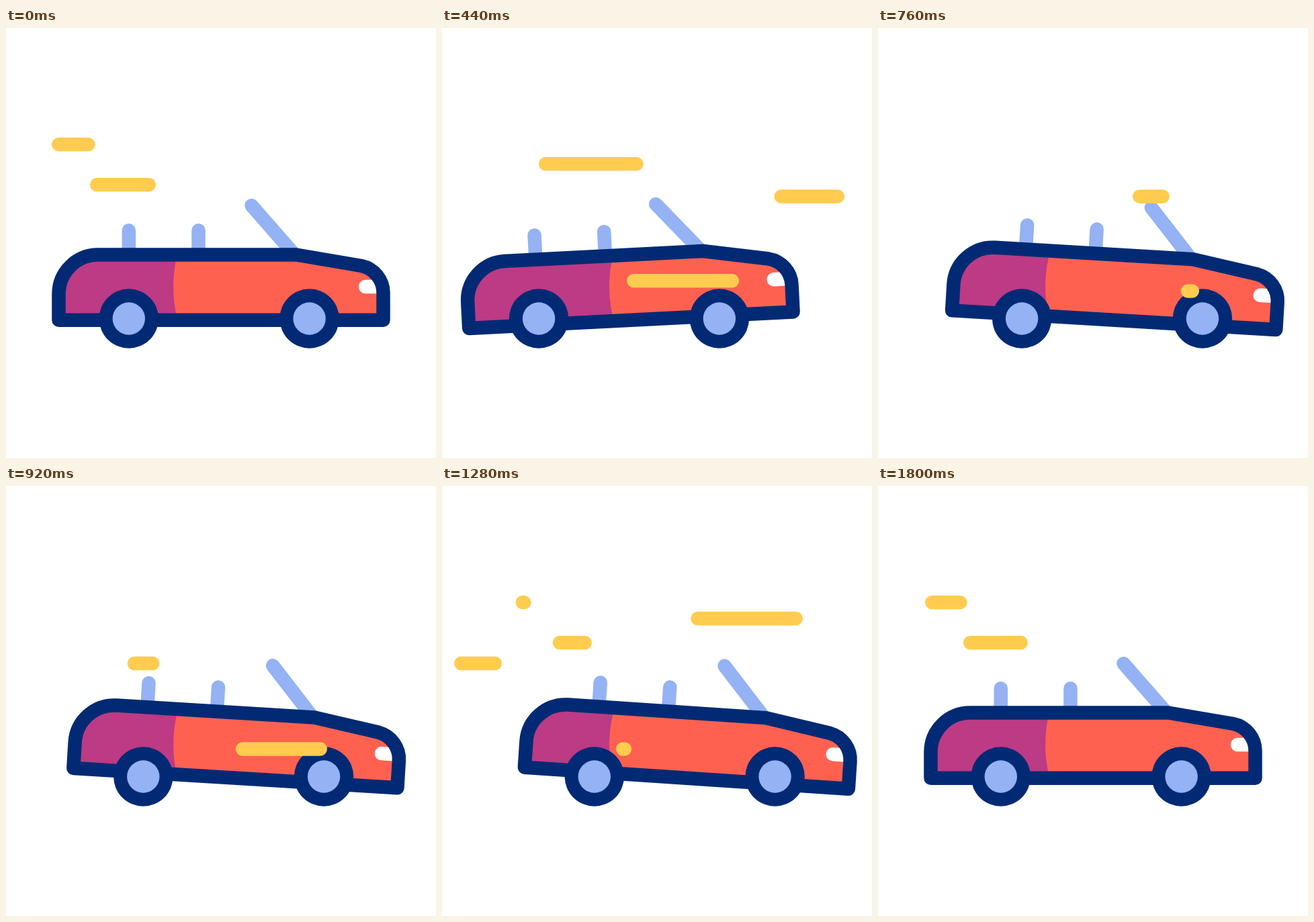
An HTML page with a canvas for the animation above (2 s loop, 640 by 640 pixels).

```html
<!DOCTYPE html>
<html lang="en">
<head>
<meta charset="utf-8">
<title>Convertible</title>
<style>
html, body { margin: 0; width: 100%; height: 100%; overflow: hidden; background: #fff; }
canvas { display: block; width: 100vw; height: 100vh; }
</style>
</head>
<body>
<canvas id="stage" width="640" height="640"></canvas>
<script>
const ctx = document.getElementById('stage').getContext('2d');
const LOOP = 2000, LAST = 1800, STEP = 40;
const NAVY = '#022a74', RED = '#ff6151', PURPLE = '#bd3a85';
const BLUE = '#94b2f4', YELLOW = '#ffcc4f';
const WIDTH = 20.5;
const PIVOT = { x: 320, y: 432.5 };

// time, shift, tilt in degrees
const drive = [
  [0, 0, 0], [320, -52, -4.1], [800, 33, 3.55],
  [1040, 10, 3.4], [1280, 44, 3.8], [1680, 0, 0]
];

// Each streak grows leftwards from `right`, then its right end catches up.
const streaks = [
  { y: 173.3, left: 68, right: 132.5, grow: -800, shrink: 0, span: 400 },
  { y: 233.2, left: 125, right: 223, grow: -800, shrink: 160, span: 280 },
  { y: 202.3, left: 144, right: 363.5, grow: 80, shrink: 304, span: 360 },
  { y: 250.8, left: 379, right: 599, grow: 279, shrink: 495, span: 360 },
  { y: 376.3, left: 224, right: 443.5, grow: 226, shrink: 424, span: 320 },
  { y: 391.5, left: 259, right: 478, grow: 720, shrink: 944, span: 360 },
  { y: 264, left: 18, right: 228.5, grow: 846, shrink: 1075, span: 310 },
  { y: 197.3, left: 364, right: 583.5, grow: 958, shrink: 1167, span: 360 },
  { y: 233.2, left: 127, right: 223, grow: 1100, shrink: LOOP, span: 360 },
  { y: 173.3, left: 68, right: 132.5, grow: 1180, shrink: LOOP, span: 711 }
];

const body = new Path2D(
  'M78.5 434.7V396A58.5 58.5 0 0 1 137 337.5H432L529 354' +
  'C548 358 561.5 375 561.5 394V434.7Z'
);

function ease(t) {
  t = Math.min(1, Math.max(0, t));
  return t * t * (3 - 2 * t);
}

function pose(t) {
  let i = 0;
  while (i < drive.length - 2 && t > drive[i + 1][0]) i++;
  const a = drive[i], b = drive[i + 1];
  const k = ease((t - a[0]) / (b[0] - a[0]));
  return {
    shift: a[1] + (b[1] - a[1]) * k,
    tilt: (a[2] + (b[2] - a[2]) * k) * Math.PI / 180
  };
}

function bar(x1, y1, x2, y2, color) {
  ctx.strokeStyle = color;
  ctx.beginPath();
  ctx.moveTo(x1, y1);
  ctx.lineTo(x2, y2);
  ctx.stroke();
}

function disc(x, y, r, color) {
  ctx.fillStyle = color;
  ctx.beginPath();
  ctx.arc(x, y, r, 0, Math.PI * 2);
  ctx.fill();
}

function tiltCar({ shift, tilt }) {
  ctx.translate(PIVOT.x + shift, PIVOT.y);
  ctx.rotate(tilt);
  ctx.translate(-PIVOT.x, -PIVOT.y);
}

function drawCar(p) {
  ctx.save();
  tiltCar(p);
  bar(182.8, 301.3, 182.8, 337, BLUE);
  bar(286.5, 301.3, 286.5, 337, BLUE);
  bar(365.5, 264.3, 427, 334.5, BLUE);

  ctx.save();
  ctx.clip(body);
  // The paint boundary stays put while the body slides over it.
  ctx.save();
  ctx.setTransform(1, 0, 0, 1, 0, 0);
  ctx.fillStyle = RED;
  ctx.fillRect(0, 0, 640, 640);
  ctx.fillStyle = PURPLE;
  ctx.beginPath();
  ctx.moveTo(0, 305);
  ctx.lineTo(265.6, 305);
  ctx.quadraticCurveTo(232.4, 385, 265.6, 465);
  ctx.lineTo(0, 465);
  ctx.fill();
  ctx.restore();
  bar(535, 385, 575, 385, '#fff');
  ctx.restore();

  ctx.strokeStyle = NAVY;
  ctx.stroke(body);
  ctx.restore();

  for (const x of [182.8, 451.6]) {
    disc(x + p.shift, PIVOT.y, 44.2, NAVY);
    disc(x + p.shift, PIVOT.y, 24.2, BLUE);
  }
}

function drawStreak(s, t) {
  const head = ease((t - s.grow) / s.span);
  const tail = ease((t - s.shrink) / s.span);
  if (head <= 0 || tail >= 1) return;
  const r = WIDTH / 2;
  const start = s.right - r;
  const reach = s.right - s.left - WIDTH;
  bar(start - reach * head, s.y, start - reach * tail, s.y, YELLOW);
}

function draw(now) {
  const t = Math.min(LAST, Math.floor((now % LOOP) / STEP) * STEP);
  ctx.fillStyle = '#fff';
  ctx.fillRect(0, 0, 640, 640);
  ctx.lineWidth = WIDTH;
  ctx.lineCap = ctx.lineJoin = 'round';
  drawCar(pose(t));
  for (const s of streaks) drawStreak(s, t);
}

const begin = performance.now();
function tick() {
  draw(performance.now() - begin);
  requestAnimationFrame(tick);
}
tick();
</script>
</body>
</html>
```
